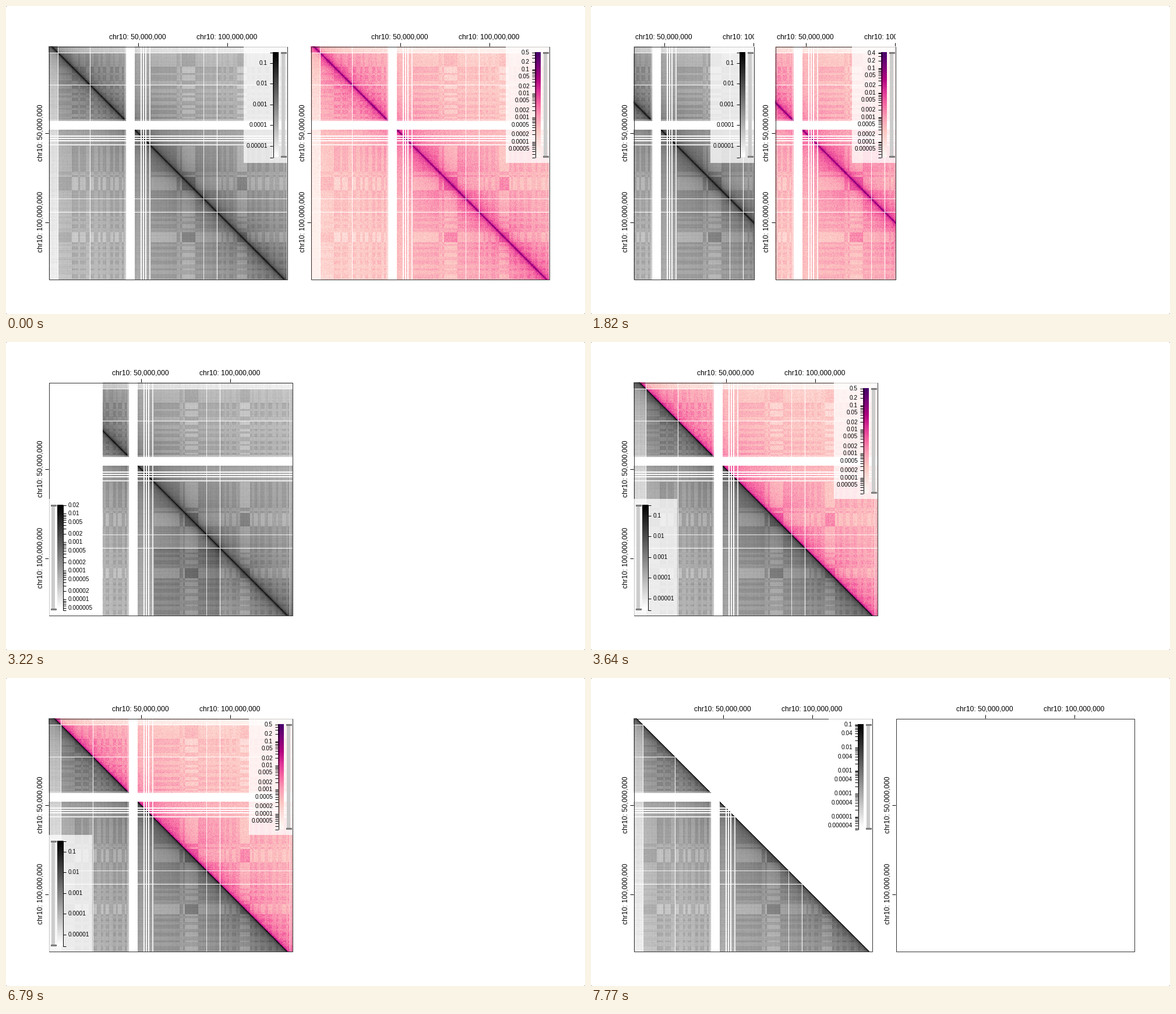
A matplotlib script for the animation above (8 s loop, 994x528 px).

```python
import math

import matplotlib.pyplot as plt
import numpy as np
from matplotlib.animation import FuncAnimation
from matplotlib.patches import Rectangle

W, H, DPI = 994, 528, 64
PX = 72 / DPI
LOOP, STEP = 8000, 20
TOP, BOTTOM = 69, 469
LEFT = 73
U0, N = -6, 432          # matrix covers positions U0 .. U0 + N, one per pixel
Y_OFF = 64               # y = position + Y_OFF
TICKS = ((153, "chr10: 50,000,000"), (306, "chr10: 100,000,000"))

plt.rcParams["font.family"] = "Liberation Sans"
fig = plt.figure(figsize=(W / DPI, H / DPI), dpi=DPI, facecolor="white")
ax = fig.add_axes([0, 0, 1, 1])
ax.axis("off")
rng = np.random.default_rng(10)
pos = np.arange(N) + U0


# ---- contact matrix -------------------------------------------------------

def compartments():
    c = np.zeros(N)

    def fill(a, b, v):
        c[(pos >= a) & (pos < b)] = v

    def stripes(a, b, lo, hi):
        flip = True
        while a < b:
            end = min(b, a + int(rng.integers(3, 8)))
            fill(a, end, lo if flip else hi)
            a, flip = end, not flip

    fill(17, 40, 0.4)
    fill(40, 51, -0.75)
    fill(51, 54, 0.3)
    fill(54, 64, -0.6)
    fill(64, 72, 0.3)
    stripes(72, 131, -0.7, 0.2)
    fill(176, 215, -0.65)
    stripes(215, 229, -0.7, 0.3)
    fill(229, 252, 0.9)
    fill(252, 266, -0.5)
    fill(266, 289, -0.45)
    stripes(290, 322, -0.65, 0)
    fill(324, 341, 0.9)
    stripes(341, 408, -0.75, -0.1)
    return c


def gaps():
    w = np.zeros(N)
    bands = ((16, 17, 1), (71, 72, 1), (131, 132, 0.6), (133, 148, 1),
             (158, 160, 1), (162, 164, 0.9), (166, 168, 1), (173, 175, 0.8),
             (266, 267, 0.85), (289, 290, 1), (409, 410, 0.6))
    for a, b, v in bands:
        w[(pos >= a) & (pos < b)] = v
    return 1 - np.outer(1 - w, 1 - w)


def sym_noise(sd):
    n = np.triu(rng.normal(0, sd, (N, N)))
    return n + np.triu(n, 1).T


def model():
    d = np.abs(pos[:, None] - pos[None, :])
    c = compartments()
    bias = rng.normal(0, 2.5, N)
    # slow decay with distance plus a thin dark diagonal
    level = 62 + 20 * np.log(np.maximum(d, 1)) - 45 * np.exp(-d / 1.5)
    level -= 28 * np.outer(c, c) * (1 - np.exp(-d / 8))
    level += bias[:, None] + bias[None, :]
    strip, arm = pos < 16, pos < 140
    level += 48 * (strip[:, None] ^ strip[None, :])
    level += 8 * (arm[:, None] ^ arm[None, :])
    return level


WHITE = gaps()[..., None]


def with_gaps(rgb):
    return rgb + (1 - rgb) * WHITE


def grey_map(level):
    v = np.clip((level + sym_noise(3)) / 255, 0.04, 0.94)
    return with_gaps(np.repeat(v[..., None], 3, axis=2))


def pink_map(level):
    t = (1 - level / 255) * 0.98 - 0.06 + sym_noise(0.035)
    return with_gaps(plt.get_cmap("RdPu")(np.clip(t, 0.03, 0.95))[..., :3])


LEVEL = model()
GREY, PINK = grey_map(LEVEL), pink_map(LEVEL)
UPPER = (pos[None, :] > pos[:, None])[..., None]
GREY_LOW = np.where(UPPER, 1, GREY)
DARK_GREY = np.clip(GREY - 0.03 * (1 - WHITE), 0, 1)
DARK_LOW = np.where(UPPER, 1, DARK_GREY)
SPLIT = np.where(UPPER, PINK, DARK_GREY)

# only some tiles have arrived: left part empty, one block darker
PARTIAL = GREY.copy()
block = (pos[:, None] > 289) & (pos[None, :] > 175) & (pos[None, :] < 289)
PARTIAL -= 0.1 * block[..., None] * (1 - WHITE)
PARTIAL = np.clip(PARTIAL, 0, 1)
PARTIAL[:, pos < 88] = 1


# ---- drawing helpers ------------------------------------------------------

scenes = []


def put(artist):
    artists = scenes[-1][1]
    artist.set_zorder(len(artists) + 1)
    artist.set_visible(False)
    artists.append(artist)
    return artist


def image(rgb, x0, x1, y0, y1):
    pixels = np.round(rgb * 255).astype(np.uint8)
    put(ax.imshow(pixels, extent=(x0, x1, y1, y0), aspect="auto",
                  interpolation="nearest"))


def box(x, y, w, h, **style):
    put(ax.add_patch(Rectangle((x, y), w, h, **style)))


def fill_box(x, y, w, h, color, alpha=1):
    box(x, y, w, h, fc=color, alpha=alpha, lw=0)


def text(x, y, s, size, **kw):
    return put(ax.text(x, y, s, fontsize=size * PX, color="black", **kw))


def hline(y, x0, x1):
    put(ax.hlines(math.floor(y) + 0.5, x0, x1, color="black", lw=PX))


def vline(x, y0, y1):
    put(ax.vlines(math.floor(x) + 0.5, y0, y1, color="black", lw=PX))


def top_axis(x0, x1, off):
    clip = Rectangle((x0, 0), x1 - x0, H, transform=ax.transData)
    for u, name in TICKS:
        label = text(u + off, 57, name, 12, ha="center", va="baseline")
        label.set_clip_on(True)
        label.set_clip_path(clip)
        vline(u + off, 63, 69)


def left_axis(x0):
    for u, name in TICKS:
        text(x0 - 11, u + Y_OFF, name, 12, ha="center", va="baseline",
             rotation=90, rotation_mode="anchor")
        hline(u + Y_OFF, x0 - 6, x0)


def border(x0, x1):
    box(x0 + 0.5, TOP + 0.5, x1 - x0 - 1, BOTTOM - TOP - 1,
        fill=False, ec="#333333", lw=PX)


def panel(rgb, x0, x1, off):
    """Heatmap between x0 and x1; position u is drawn at x = u + off."""
    a, b = x0 - off - U0, x1 - off - U0
    r0, r1 = TOP - Y_OFF - U0, BOTTOM - Y_OFF - U0
    image(rgb[r0:r1, a:b], x0, x1, TOP, BOTTOM)
    border(x0, x1)
    top_axis(x0, x1, off)
    left_axis(x0)


def colorbar(edge, cmap, y_tenth, decade, digits=(1,), minor=True,
             low=False, extra=()):
    """Scale at the top right, or with low=True at the bottom left."""
    sign, top = (1, 279) if low else (-1, 79)
    end = top + 180

    def span(a, b):
        return min(edge + sign * a, edge + sign * b)

    fill_box(span(0, 75), top - 10, 75, 200, "white", 0.75)
    ramp = plt.get_cmap(cmap)(np.linspace(1, 0, 60))[:, None, :3]
    image(ramp, span(15, 25), span(15, 25) + 10, top, end)

    axis = edge + sign * 25
    tip = axis + sign * 5
    vline(axis - (1 if low else 0), top, end + 1)
    for y in (top, end):
        hline(y, min(axis, tip), max(axis, tip))
    for e in range(1, 7):
        for n in range(1, 10):
            y = y_tenth + decade * (e - 1 - math.log10(n))
            if not top - 0.6 <= y <= end:
                continue
            value = f"{n * 10 ** -e:.{e}f}"
            major = n in digits or value in extra
            if major or minor:
                hline(y, min(axis, tip), max(axis, tip))
            if major:
                text(edge + sign * 34, y + 3.6, value, 10,
                     ha="left" if low else "right", va="baseline")

    x = span(3, 12)
    fill_box(x + 2, top, 6, 180, "#cccccc")
    for y in (top - 0.5, end - 2.5):
        box(x + 0.5, y, 9, 2.5, fc="#999999", ec="#555555", lw=0.8 * PX)


def grey_bar(edge, low=False):
    colorbar(edge, "gray_r", 297 if low else 97, 35.5, minor=False, low=low)


def pink_bar(edge):
    colorbar(edge, "RdPu", 108, 41.4, (1, 2, 5))


def wide_bar(edge):
    colorbar(edge, "gray_r", 79, 39.5, (1, 4))


def scene(start):
    scenes.append((start, []))


# ---- scenes ---------------------------------------------------------------

MID, WIDE, RIGHT, FAR = 483, 492, 523, 933
WIDE_OFF = 78

scene(0)
panel(GREY, LEFT, MID, LEFT)
grey_bar(MID)
panel(PINK, RIGHT, FAR, RIGHT)
pink_bar(FAR)

scene(1190)
panel(GREY, LEFT, MID, LEFT)
grey_bar(MID)
left_axis(RIGHT)

scene(1820)
panel(GREY, LEFT, 280, -28)
grey_bar(280)
panel(PINK, 316, RIGHT, 215)
colorbar(RIGHT, "RdPu", 106, 42, (1, 2, 5), extra=("0.4",))

scene(1890)
panel(PINK, LEFT, WIDE, WIDE_OFF)
pink_bar(WIDE)

scene(3150)
panel(PARTIAL, LEFT, WIDE, WIDE_OFF)
colorbar(LEFT, "gray_r", 244.8, 49, (1, 2, 5), low=True)

scene(3290)
panel(DARK_LOW, LEFT, WIDE, WIDE_OFF)
grey_bar(LEFT, low=True)

scene(3640)
panel(SPLIT, LEFT, WIDE, WIDE_OFF)
pink_bar(WIDE)
grey_bar(LEFT, low=True)

scene(7490)
panel(GREY_LOW, LEFT, MID, LEFT)
wide_bar(MID)
top_axis(RIGHT, FAR, RIGHT)
left_axis(RIGHT)

scene(7700)
panel(GREY_LOW, LEFT, MID, LEFT)
wide_bar(MID)
border(RIGHT, FAR)
top_axis(RIGHT, FAR, RIGHT)
left_axis(RIGHT)

for cx in (0, W - 1):
    for cy in (0, H - 1):
        ax.add_patch(Rectangle((cx, cy), 1, 1, fc="#777777", lw=0))

ax.set_xlim(0, W)
ax.set_ylim(H, 0)


def draw(i):
    # a scene that starts within this frame's slot is already shown
    end = (i + 1) * STEP
    current = max(k for k, (start, _) in enumerate(scenes) if start < end)
    for k, (_, artists) in enumerate(scenes):
        for artist in artists:
            artist.set_visible(k == current)
    return []


anim = FuncAnimation(fig, draw, frames=LOOP // STEP, interval=STEP,
                     init_func=lambda: draw(0), repeat=True, repeat_delay=0)
plt.show()
```
